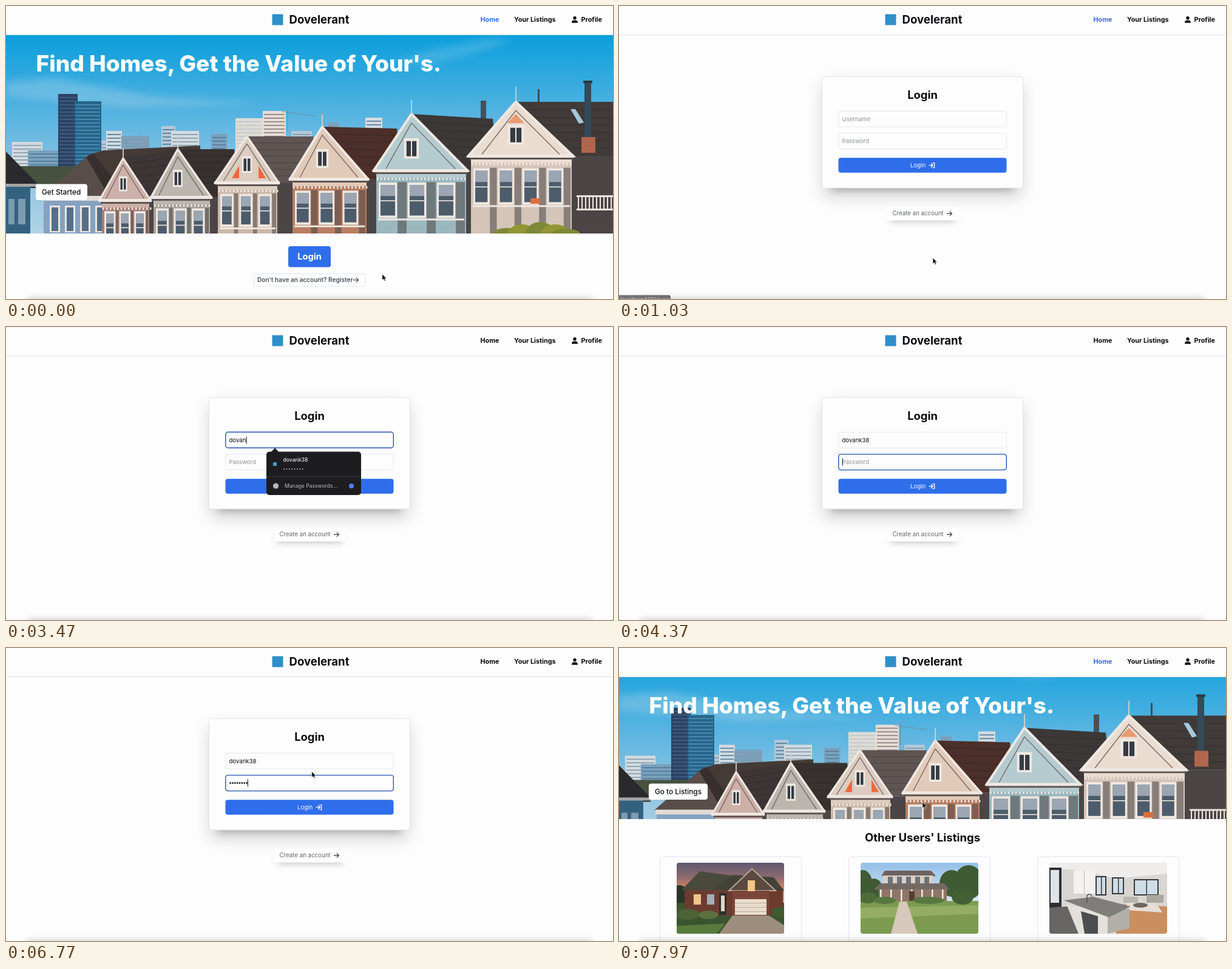
An HTML page that plays this animation: 1000 px wide and 483 px high, repeating every 8000 ms.

```html
<!DOCTYPE html>
<html lang="en">
<head>
<meta charset="utf-8">
<title>Property login</title>
<style>
  html, body { margin: 0; width: 100%; height: 100%; overflow: hidden; background: #fdfdfe; }
  svg { display: block; }
  text { font-family: Inter, Roboto, sans-serif; white-space: pre; }
</style>
</head>
<body>
<svg id="stage" width="1000" height="483" viewBox="0 0 1000 483"></svg>
<script>
const LOOP = 8000;
const BLUE = '#2f6eea', HOVER = '#1d53cc', PAGE = '#fdfdfe', EDGE = '#e3e5ea', INK = '#0b0b0e', DARK = '#1d1d20';
const USER = 'dovank38';

// Markup helpers
const rect = (x, y, w, h, fill, extra = '') =>
  `<rect x="${x}" y="${y}" width="${w}" height="${h}" fill="${fill}" ${extra}/>`;
const poly = (points, fill, extra = '') => `<polygon points="${points}" fill="${fill}" ${extra}/>`;
const path = (d, stroke, width = 1.3, extra = '') =>
  `<path d="${d}" fill="none" stroke="${stroke}" stroke-width="${width}" stroke-linecap="round" stroke-linejoin="round" ${extra}/>`;
const oval = (x, y, rx, ry, fill) => `<ellipse cx="${x}" cy="${y}" rx="${rx}" ry="${ry}" fill="${fill}"/>`;
const text = (x, y, size, weight, fill, str, extra = '') =>
  `<text x="${x}" y="${y}" font-size="${size}" font-weight="${weight}" fill="${fill}" ${extra}>${str}</text>`;
const group = (id, body) => `<g id="${id}">${body}</g>`;
const fade = (id, ...stops) => `<linearGradient id="${id}" x1="0" y1="0" x2="0" y2="1">` +
  stops.map((c, i) => `<stop offset="${i / (stops.length - 1)}" stop-color="${c}"/>`).join('') + '</linearGradient>';
const arrow = (x, y, color) => path(`M${x} ${y}h8m-3.4 -3.4l3.4 3.4l-3.4 3.4`, color);
const MID = 'text-anchor="middle"';
const each = (n, f) => Array.from({ length: n }, (_, i) => f(i)).join('');

const defs = `<defs>
  ${fade('sky', '#069ddb', '#46afe0', '#8cc3e2', '#b2d3e4')}
  ${fade('dusk', '#5d586f', '#8d6a70', '#e38b5c', '#e9a87a')}
  ${fade('day', '#94bfe8', '#dde8f0')}
  <filter id="soft" x="-30%" y="-60%" width="160%" height="220%"><feGaussianBlur stdDeviation="14"/></filter>
  <filter id="near" x="-30%" y="-150%" width="160%" height="400%"><feGaussianBlur stdDeviation="6"/></filter>
  <clipPath id="shot"><rect width="194" height="117" rx="4"/></clipPath>
  <clipPath id="shotSmall"><rect width="177" height="117" rx="4"/></clipPath>
</defs>`;

// Hero picture
function tower(x, y, w, color, line) {
  return rect(x, y, w, 270 - y, color) +
    each(Math.floor((262 - y) / 6), i => rect(x + 2, y + 5 + i * 6, w - 4, 1.6, line));
}

function house([ax, ay, lx, rx, ey, ridgeX, ridgeY, wall, gable, roof, bays]) {
  const trim = '#efe8e2', shade = '#4b4546';
  const w = rx - lx, k = w / 150, h = ey - ay;
  const step = (w - 10) / bays, bw = step * .5, top = ey + 20 + 4 * k, bh = 38 + 12 * k;
  return rect(lx + 4, ey, ridgeX - lx + 26, 380 - ey, shade) +
    rect(lx + 4, ey, w - 6, 380 - ey, wall) +
    poly([ax, ay, ridgeX, ridgeY, ridgeX + 8, ey, rx, ey], roof) +
    each(6, i => {
      const f = (i + 1) / 7;
      return path(`M${ax + (rx - ax) * f} ${ay + h * f}L${ridgeX + 4} ${ridgeY + (ey - ridgeY) * f}`, '#17151a', .8, 'opacity=".35"');
    }) +
    poly([ax, ay, lx, ey, rx, ey], gable, `stroke="${trim}" stroke-width="${2 + 2 * k}"`) +
    path(`M${lx + w * .13} ${ey - 3}L${ax} ${ay + h * .16}L${rx - w * .13} ${ey - 3}`, '#746a68', 1.4) +
    path(`M${ax} ${ay}v${-8 - 14 * k}`, '#d6d0cc', 1.8) +
    rect(ax - 12 * k, ay + h * .43, 24 * k, h * .36, trim) +
    rect(ax - 8 * k, ay + h * .48, 16 * k, h * .27, '#353b44') +
    rect(ax - 1, ay + h * .46, 2, h * .3, trim) +
    rect(lx - 2, ey - 2, w + 4, 5, trim) + rect(lx + 2, ey + 3, w - 2, 3, '#5e5452') +
    rect(lx + 4, ey + 6, w - 6, 6, gable) +
    each(Math.floor(w / 6), i => rect(lx + 5 + i * 6, ey + 12, 2.4, 4, trim)) +
    each(bays, i => {
      const x = lx + 11 + i * step;
      return rect(x + bw + 4, top - 5, step - bw - 9, 380 - top, shade, 'opacity=".55"') +
        rect(x - 3, top - 4, bw + 6, bh + 8, trim) + rect(x, top, bw, bh, '#4d5c6b') +
        rect(x, top, bw, bh * .36, '#9ba6b2') + rect(x, top + bh / 2, bw, 1.6, trim);
    }) +
    rect(lx + 7, top + bh + 5, w - 12, 3, trim);
}

// apex, eaves, ridge end, colours, bay count
const houses = [
  [193, 251, 154, 238, 320, 282, 236, '#a88078', '#cdb0a8', '#3d3536', 3],
  [283, 236, 239, 338, 315, 376, 236, '#a5a199', '#bbb6ae', '#37312f', 3],
  [397, 215, 345, 449, 291, 506, 215, '#cdb8a8', '#dccdc0', '#5f5553', 3],
  [521, 199, 468, 596, 285, 644, 202, '#b87f62', '#e2cab8', '#4b2f28', 3],
  [668, 178, 606, 760, 271, 802, 186, '#9cb8bf', '#b4cbd0', '#3b3837', 3],
  [840, 158, 762, 934, 247, 1004, 158, '#d4c5b8', '#eadccf', '#403a38', 4]
];

const skyline = [
  [10, 224, 50], [36, 238, 78], [135, 222, 60], [165, 206, 26], [190, 214, 46], [256, 198, 23],
  [272, 206, 46], [338, 211, 26], [470, 206, 34], [592, 184, 28], [530, 192, 18]
].map(([x, y, w], i) => tower(x, y, w, ['#d3dbe0', '#7ba1bd', '#b4c8d6'][i % 3], ['#8298a8', '#4d7a9a'][i % 2])).join('');

const picture = rect(0, 40, 1000, 340, 'url(#sky)') +
  poly('640,92 700,72 800,52 835,58 760,82 690,98', '#9fd2ee', 'opacity=".25" filter="url(#near)"') +
  poly('0,125 80,118 250,150 420,160 200,168 0,150', '#b4d5e8', 'opacity=".35" filter="url(#near)"') +
  skyline + tower(86, 145, 32, '#2c4362', '#45628a') + tower(113, 157, 44, '#27658c', '#5292b6') +
  tower(378, 185, 45, '#dcdcd6', '#c0c6ca') + tower(423, 173, 38, '#e6dcd6', '#8c7c7a') +
  path('M464 205V170M455 174L508 181', '#6f8fa4', 1) +
  rect(0, 264, 420, 30, '#46513f') +
  poly('0,240 52,293 52,300 0,300', '#2a2a2e') + rect(0, 293, 40, 90, '#33627f') +
  rect(0, 293, 52, 5, '#a5a5a4') + rect(4, 318, 10, 42, '#7c9bb0') + rect(20, 318, 12, 42, '#7c9bb0') +
  poly('135,246 160,238 320,230 320,262 190,280 160,312', '#443a36') +
  poly('58,314 132,249 180,314', '#584d48') + poly('132,249 145,244 180,290 170,314', '#362f2e') +
  rect(60, 313, 108, 8, '#e2dcd6') + rect(62, 321, 105, 60, '#86a2c0') +
  each(4, i => rect(72 + i * 25, 329, 17, 44, '#eae5e0') + rect(75 + i * 25, 332, 11, 39, '#556f88')) +
  rect(782, 156, 9, 56, '#4b5054') + rect(876, 137, 3, 26, '#3c4c58') +
  houses.map(house).join('') +
  poly('372,284 384,263 384,284', '#f0683c') + poly('416,263 428,284 416,284', '#f0683c') +
  poly('826,193 840,178 854,193', '#e79a70') +
  poly('930,170 938,170 952,192 944,194', '#a4c8da') +
  rect(953, 125, 11, 96, '#344a58') + rect(951, 123, 15, 4, '#2a3a46') + rect(948, 216, 23, 26, '#b0664c') +
  rect(940, 312, 60, 3, '#efe8e0') + each(10, i => rect(942 + i * 6, 315, 2, 20, '#efe8e0')) +
  rect(940, 334, 60, 3, '#efe8e0') + rect(864, 317, 16, 9, '#d9703c') +
  [825, 850, 880, 905, 922].map((x, i) => oval(x, 376, 24, [10, 16, 20, 16, 9][i], i % 2 ? '#939634' : '#7f8836')).join('');

// Listing pictures, drawn from their own corner
const dusk = rect(0, 0, 177, 70, 'url(#dusk)') + oval(4, 55, 16, 18, '#2b3428') + rect(0, 66, 177, 51, '#39542e') +
  rect(13, 42, 162, 45, '#6c3b30') + poly('8,45 38,14 98,22 104,46', '#4a4a3c') +
  poly('62,44 92,20 160,24 177,46', '#424238') + poly('86,46 124,10 163,46', '#5a4a40', 'stroke="#b9a692" stroke-width="2"') +
  rect(92, 46, 60, 40, '#7a4538') + rect(96, 60, 52, 26, '#e8dccc') +
  each(3, i => rect(96, 66 + i * 7, 52, 1, '#bcae9e')) + rect(117, 29, 12, 18, '#f0c888') +
  rect(28, 52, 12, 17, '#f1c58a') + rect(50, 52, 12, 17, '#9fb0b8') + rect(70, 50, 12, 36, '#2f2f2e') +
  rect(73, 54, 6, 26, '#e2d5bc') + poly('92,87 152,87 177,103 177,117 70,117', '#9d8d7c') +
  oval(18, 85, 20, 9, '#4a6236') + oval(52, 86, 16, 7, '#5a723e') + oval(168, 82, 12, 9, '#425a32') +
  poly('0,104 80,100 66,117 0,117', '#587a3c');

const lawn = rect(0, 0, 194, 70, 'url(#day)') +
  [[4, 38, 16, 26], [22, 46, 15, 20], [150, 34, 20, 22], [178, 32, 24, 28]].map(a => oval(...a, '#3f5b34')).join('') +
  poly('34,22 40,13 116,13 124,22', '#6e6160') + rect(37, 21, 82, 42, '#d9cfc4') +
  each(5, i => rect(45 + i * 15, 23, 8, 11, '#6c747c')) + poly('22,44 32,34 138,34 146,44', '#756964') +
  rect(30, 44, 112, 20, '#8e7568') + each(7, i => rect(32 + i * 17, 44, 2.5, 20, '#f2ece2')) +
  rect(80, 47, 9, 17, '#5a3c34') + rect(0, 63, 194, 54, '#7c9b50') +
  poly('0,74 194,70 194,84 0,92', '#93ad64') + poly('64,64 76,64 94,117 50,117', '#d6c8ba') +
  oval(12, 58, 16, 9, '#4e6c3a') + oval(40, 62, 18, 6, '#587840') + oval(112, 62, 26, 6, '#587840') + oval(168, 56, 18, 13, '#436034');

const kitchen = rect(0, 0, 194, 117, '#d8d6d2') + poly('0,0 194,0 194,18 110,26 60,14 0,8', '#eeedeb') +
  rect(0, 8, 20, 66, '#2f3032') + rect(2, 12, 14, 54, '#dfe4e8') +
  rect(40, 13, 36, 38, '#f4f2f0') + rect(57, 13, 1, 38, '#b9b6b0') +
  [[76, 22, 18, 32], [103, 24, 20, 28], [139, 27, 41, 27]].map(([x, y, w, h]) =>
    rect(x, y, w, h, '#38393a') + rect(x + 2, y + 2, w - 4, h - 4, '#cfdde6') + rect(x + w / 2, y, 1.5, h, '#38393a')).join('') +
  poly('110,68 194,72 194,117 110,117', '#c98f60') + poly('128,64 176,66 186,82 126,78', '#e4ded6') +
  rect(160, 53, 28, 13, '#aaa7a0') + rect(122, 56, 24, 10, '#bab6b0') + oval(150, 70, 12, 4, '#6d6660') +
  poly('0,74 30,72 50,117 0,117', '#676664') + poly('28,68 96,84 96,117 48,117', '#e4e1dc') +
  poly('96,84 132,75 132,108 96,117', '#b3afa8') + poly('24,62 72,56 134,72 98,90', '#7f7e7a') +
  poly('52,80 80,88 80,117 58,117', '#4c4d4e') + path('M62 66V54q5 -5 8 1', '#555658', 1.5);

const card = (x, px, clip, art) => rect(x, 344, 233, 150, PAGE, `rx="5" stroke="${EDGE}"`) +
  `<g transform="translate(${px} 354)"><g clip-path="url(#${clip})">${art}</g></g>`;

const pill = (y, w, label) => rect(49, y, w, 26.5, '#fff', 'rx="4"') + text(59, y + 17, 11.8, 500, INK, label);

const home = group('home',
  `<svg id="hero" x="0" y="48" width="1000" height="327" viewBox="0 48 1000 327" preserveAspectRatio="none">${picture}</svg>` +
  text(49.5, 107.5, 37.1, 800, '#fff', "Find Homes, Get the Value of Your's.") +
  group('guest', pill(293.5, 85, 'Get Started') +
    rect(465, 396, 70, 34.5, BLUE, 'id="enter" rx="4"') + text(500, 418, 14.6, 700, '#fff', 'Login', MID) +
    rect(408.5, 441.5, 183, 20.5, PAGE, `rx="4" stroke="${EDGE}"`) +
    text(414, 455, 10.1, 600, '#4b4f5c', "Don't have an account? Register") + arrow(572.5, 451.7, '#4b4f5c')) +
  group('member', pill(223.5, 97, 'Go to Listings') +
    text(500, 319, 18.5, 700, INK, "Other Users' Listings", MID) +
    card(67.5, 95, 'shotSmall', dusk) + card(378.5, 398, 'shot', lawn) + card(690, 709, 'shot', kitchen)));

const field = (id, y) => rect(361.8, y, 276.5, 26, PAGE, `id="${id}" rx="4"`);
const login = group('login',
  rect(336, 128, 328, 186, '#000', 'rx="8" opacity=".17" filter="url(#soft)"') +
  rect(350, 280, 300, 24, '#000', 'opacity=".2" filter="url(#near)"') +
  rect(334.5, 116.5, 331, 183.5, PAGE, `rx="4" stroke="${EDGE}"`) +
  text(500, 153, 18.4, 700, INK, 'Login', MID) +
  field('userBox', 173.3) + field('passBox', 209.6) +
  text(367.5, 189.6, 9.6, 400, '#8d9199', 'Username', 'id="userHint"') +
  text(367.5, 225.8, 9.6, 400, '#8d9199', 'Password', 'id="passHint"') +
  text(367.5, 189.6, 9.6, 400, INK, '', 'id="user"') +
  group('dots', each(8, i => `<circle cx="${369.6 + i * 3.85}" cy="222.6" r="1.35" fill="${INK}"/>`)) +
  rect(0, 0, 1, 12, INK, 'id="caret"') +
  rect(361.5, 250.3, 277, 24.5, BLUE, 'id="send" rx="4"') +
  text(480, 265.8, 9.6, 400, '#fff', 'Login') +
  path('M511 262.6h6m-2.6 -2.8l2.8 2.8l-2.8 2.8M517 258.6h2.6v8h-2.6', '#fff', 1.4) +
  rect(447, 342, 107, 13, '#000', 'opacity=".25" filter="url(#near)"') +
  rect(441, 331, 119, 22.5, '#fff', 'rx="4"') +
  text(450.5, 345.4, 9.7, 400, '#5f626a', 'Create an account') + arrow(540.5, 342, '#4b4e56') +
  group('popup',
    rect(429, 205.5, 156, 71.5, DARK, 'rx="5"') + poly('436.5,206 443,199.5 449.5,206', DARK) +
    rect(440, 223, 6, 6, '#3f9fd0') + text(456.5, 221.7, 8.6, 500, '#e8e8ea', USER) +
    each(8, i => `<circle cx="${458 + i * 4.4}" cy="234.2" r=".9" fill="#d4d4d8"/>`) +
    rect(429, 246.3, 156, 1, '#3a3a3e') + `<circle cx="444.5" cy="262" r="4.6" fill="#b8b8bc"/>` +
    text(459, 265.2, 8.6, 400, '#b8b8bc', 'Manage Passwords…') + `<circle cx="569" cy="262" r="4" fill="#4a80e8"/>`));

const header = rect(0, 0, 1000, 47, PAGE) + rect(0, 47, 1000, 1, EDGE) +
  rect(438.5, 13.5, 18, 18, '#2f8fc8') + text(466.5, 28.5, 18.6, 700, INK, 'Dovelerant') +
  text(781.5, 26.2, 10.8, 700, BLUE, 'Home', 'id="homeLink"') +
  text(837, 26.2, 10.8, 700, INK, 'Your Listings') + text(947.5, 26.2, 10.8, 700, INK, 'Profile') +
  `<circle cx="937" cy="19.7" r="2.7" fill="${INK}"/><path d="M932 27.8q0 -4.4 3.6 -4.4h2.8q3.6 0 3.6 4.4z" fill="${INK}"/>`;

const status = (id, w, fill, label) =>
  group(id, `<path d="M0 483V476.5H${w - 3}q3 0 3 3V483z" fill="${fill}"/>` + text(3, 487, 8.6, 400, '#c8c8cc', label));

document.getElementById('stage').innerHTML = defs + rect(0, 0, 1000, 483, PAGE) + home + login + header +
  rect(35, 482, 930, 20, '#000', 'opacity=".2" filter="url(#near)"') +
  status('link', 85, '#3a3a3e', 'localhost:5173/login') + status('wait', 332, DARK, 'Waiting for server.info...') +
  group('cursor', `<path id="pointer" d="M0 0v10l2.3 -2l1.6 3.4l1.7 -.8l-1.6 -3.2h3z" fill="#08080a" stroke="#f4f4f6" stroke-width=".7"/>` +
    path('M-1.6 -5q1.6 0 1.6 1.4q0 -1.4 1.6 -1.4M0 -4v8M-1.6 5q1.6 0 1.6 -1.4q0 1.4 1.6 1.4', INK, 1, 'id="beam"'));

const el = {};
document.querySelectorAll('#stage [id]').forEach(n => el[n.id] = n);
const show = (id, on) => el[id].style.display = on ? '' : 'none';
const set = (id, attrs) => { for (const k in attrs) el[id].setAttribute(k, attrs[k]); };
const ramp = (t, a, b) => Math.min(1, Math.max(0, (t - a) / (b - a)));
const passed = (list, t) => list.filter(x => x <= t);

// Timeline in ms
const userKeys = [2870, 3020, 3170, 3320, 3460, 3770, 3930, 4090];
const passKeys = [5100, 5200, 5370, 5400, 5560, 6030, 6230, 6430];
const FOCUS_USER = 2470, FOCUS_PASS = 4370, BLUR = 7100, TO_LOGIN = 930, TO_HOME = 7700;
const ease = { line: k => k, out: k => 1 - (1 - k) ** 2, both: k => k * k * (3 - 2 * k) };
const moves = [
  [0, 620, 442], [530, 539, 416, 'line'], [830, 517, 415, 'out'], [1570, 517, 415, 'line'],
  [2370, 505, 187, 'both'], [6600, 505, 187, 'line'], [7130, 500, 254, 'both'], [LOOP, 500, 254, 'line']
];

function pointerAt(t) {
  const i = Math.max(1, moves.findIndex(m => m[0] >= t));
  const [t0, x0, y0] = moves[i - 1], [t1, x1, y1, kind] = moves[i];
  const k = ease[kind](ramp(t, t0, t1));
  return [x0 + (x1 - x0) * k, y0 + (y1 - y0) * k];
}

function render(t) {
  const onLogin = t >= TO_LOGIN && t < TO_HOME, member = t >= TO_HOME;
  show('home', !onLogin); show('login', onLogin);
  show('guest', !member); show('member', member);
  set('hero', member ? { height: 234, viewBox: '0 94.5 1000 234' } : { height: 327, viewBox: '0 48 1000 327' });

  const lit = t < 4000 ? 1 - ramp(t, 1030, 1130) : ramp(t, TO_HOME, 7850);
  set('homeLink', { fill: `rgb(${11 + 36 * lit},${11 + 99 * lit},${14 + 220 * lit})` });

  const [x, y] = pointerAt(t);
  const inside = (l, r, top, bottom) => x > l && x < r && y > top && y < bottom;
  set('enter', { fill: inside(465, 535, 396, 430) ? HOVER : BLUE });
  set('send', { fill: inside(361, 638, 250, 275) ? HOVER : BLUE });
  const overField = onLogin && (inside(361, 638, 173, 199) || inside(361, 638, 209, 236));
  show('cursor', t < userKeys[0] || t >= 6600);
  show('pointer', !overField); show('beam', overField);
  set('cursor', { transform: `translate(${x.toFixed(2)} ${y.toFixed(2)})` });

  const focus = t < FOCUS_USER || t >= BLUR ? '' : t < FOCUS_PASS ? 'user' : 'pass';
  for (const name of ['user', 'pass'])
    set(name + 'Box', focus === name ? { stroke: '#2456b0', 'stroke-width': 1.4 } : { stroke: EDGE, 'stroke-width': 1 });

  const typed = passed(userKeys, t).length, dots = passed(passKeys, t).length;
  el.user.textContent = USER.slice(0, typed);
  show('userHint', !typed); show('passHint', !dots);
  [...el.dots.children].forEach((d, i) => d.style.display = i < dots ? '' : 'none');
  show('popup', t >= 2600 && t < 4300);

  const last = Math.max(...passed([0, FOCUS_USER, FOCUS_PASS, ...userKeys, ...passKeys], t));
  show('caret', focus && (t - last) % 1000 < 500);
  if (focus === 'user') set('caret', { x: 367.8 + (typed ? el.user.getComputedTextLength() : 0), y: 180.5 });
  else set('caret', { x: 367.8 + dots * 3.85 - (dots ? .8 : 0), y: 216.5 });

  el.link.style.opacity = 1 - ramp(t, TO_LOGIN, 1130) * .6;
  show('link', t >= TO_LOGIN && t < 1130);
  el.wait.style.opacity = .4 + .6 * ramp(t, 7430, 7500);
  show('wait', t >= 7430 && t < TO_HOME);
}

const begin = performance.now();
(function frame() {
  render((performance.now() - begin) % LOOP);
  requestAnimationFrame(frame);
})();
</script>
</body>
</html>
```
